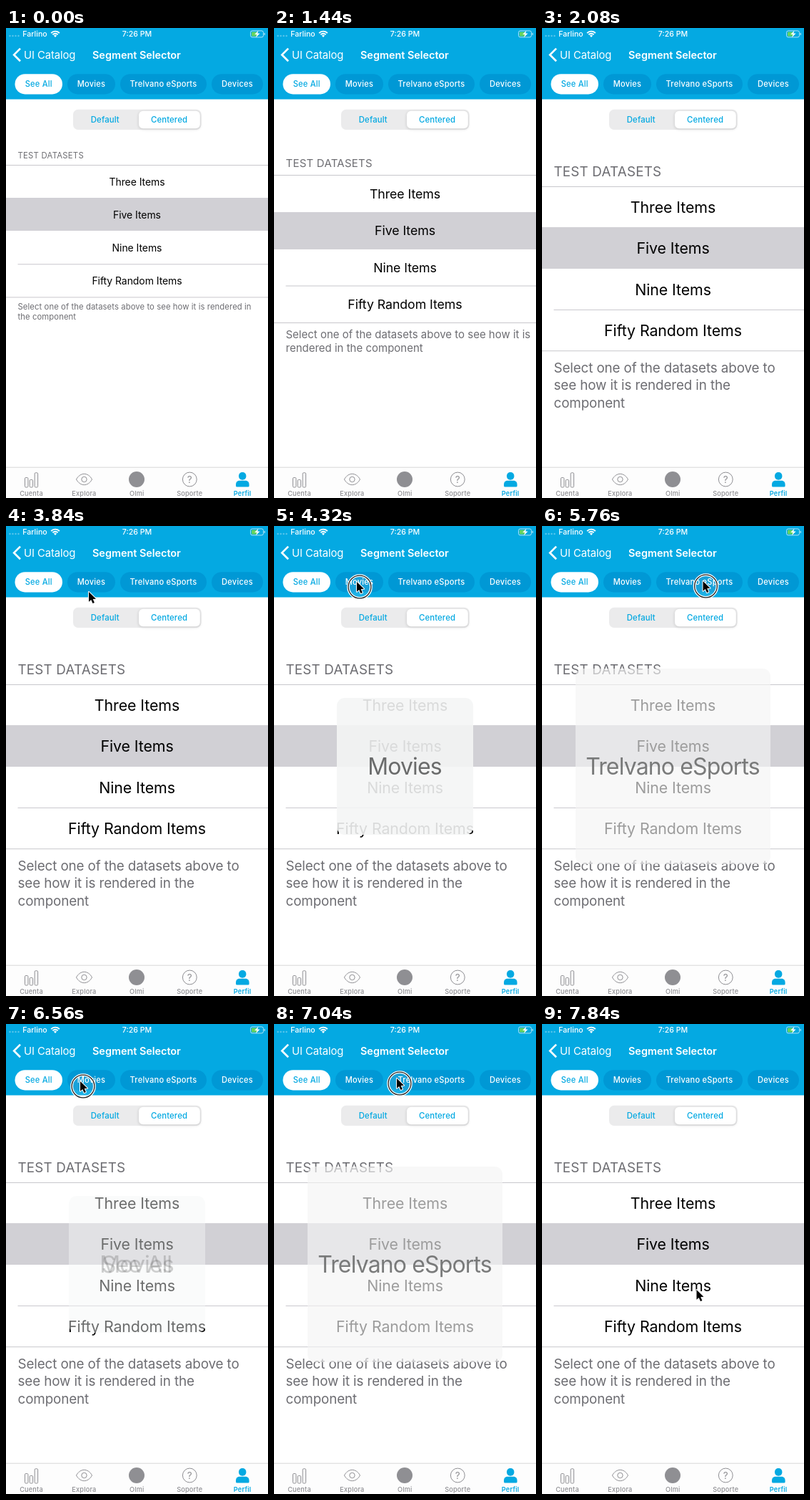
Write an HTML page with a canvas that moves like this. It is 367 px wide and 656 px high and loops after 8 s.

```html
<!DOCTYPE html>
<html lang="en">
<head>
<meta charset="utf-8">
<title>Segment Selector</title>
<style>
  html, body { margin: 0; width: 100%; height: 100%; overflow: hidden; background: #fff; }
  canvas { display: block; width: 367px; height: 656px; }
</style>
</head>
<body>
<canvas id="stage"></canvas>
<script>
const W = 367, H = 656, LOOP = 8000, STEP = 160;
const BLUE = '#04a9e2', CHIP = '#0098d5', GRAY = '#6d6d72', LINE = '#c8c7cc', TAB = '#8f8f93';
const WIDE = 'Trelvano eSports';

const canvas = document.getElementById('stage');
const ctx = canvas.getContext('2d');
const dpr = window.devicePixelRatio || 1;
canvas.width = W * dpr;
canvas.height = H * dpr;

// Table layout for each text size setting
const layouts = [
  { from: 0, header: 182, top: 191.5, row: 46.1, body: 14, small: 11.3, track: .007,
    foot: 393, lead: 14.4,
    lines: ['Select one of the datasets above to see how it is rendered in', 'the component'] },
  { from: 1440, header: 194, top: 205.5, row: 51.5, body: 17.8, small: 15, track: 0,
    foot: 433, lead: 19.4,
    lines: ['Select one of the datasets above to see how it is', 'rendered in the component'] },
  { from: 2080, header: 206.5, top: 221.5, row: 57.3, body: 21.4, small: 18.85, track: -.007,
    foot: 481, lead: 24.3,
    lines: ['Select one of the datasets above to', 'see how it is rendered in the', 'component'] }
];
const rows = ['Three Items', 'Five Items', 'Nine Items', 'Fifty Random Items'];

// time, label, panel opacity, outgoing label
const popups = [
  [4000, 'Movies', .3], [4160, 'Movies', .75], [4320, 'Movies', .89],
  [4800, WIDE, .64], [4960, WIDE, .89],
  [5280, 'Devices', .64], [5440, 'Devices', .89],
  [5760, WIDE, .64], [5920, WIDE, .89],
  [6080, 'Movies', .64], [6240, 'Movies', .89], [6400, 'See All', .89],
  [6560, 'Movies', .44, 'See All'], [6720, 'Movies', .89],
  [7040, WIDE, .64], [7200, WIDE, .89],
  [7520, WIDE, .64], [7680, WIDE, .25], [7840, '', 0]
];

// time, x, y of the pointer tip
const path = [
  [2880, 345, 488], [3360, 225, 275], [3840, 116, 92], [4000, 116, 80], [4320, 116, 78],
  [4640, 116, 78], [4960, 207.5, 76], [5280, 312, 77], [5440, 318, 77], [5760, 225.5, 77],
  [6080, 140, 78], [6400, 66, 80], [6560, 104, 80], [6880, 122, 78], [7040, 172, 76],
  [7200, 196, 76], [7360, 196, 76], [7520, 199, 95], [7840, 216.5, 371]
];

const latest = (list, t, key) => list.filter(k => k[key] <= t).pop();

function pointerAt(t) {
  const i = path.findIndex(k => k[0] > t);
  if (i < 0) return path[path.length - 1].slice(1);
  if (i === 0) return null;
  const [t0, x0, y0] = path[i - 1], [t1, x1, y1] = path[i];
  const u = (t - t0) / (t1 - t0);
  return [x0 + (x1 - x0) * u, y0 + (y1 - y0) * u];
}

function text(str, x, y, size, color, { weight = 400, align = 'left', track = 0 } = {}) {
  ctx.font = `${weight} ${size}px Inter, Roboto, sans-serif`;
  ctx.letterSpacing = `${track * size}px`;
  ctx.textAlign = align;
  ctx.fillStyle = color;
  ctx.fillText(str, x, y);
}

function rect(x, y, w, h, color) {
  ctx.fillStyle = color;
  ctx.fillRect(x, y, w, h);
}

function round(x, y, w, h, r, fill, stroke) {
  ctx.beginPath();
  ctx.roundRect(x, y, w, h, r);
  paint(fill, stroke);
}

function circle(x, y, r, fill, stroke) {
  ctx.beginPath();
  ctx.arc(x, y, r, 0, Math.PI * 2);
  paint(fill, stroke);
}

function poly(points, fill, stroke, closed = true) {
  ctx.beginPath();
  points.forEach(([x, y]) => ctx.lineTo(x, y));
  if (closed) ctx.closePath();
  paint(fill, stroke);
}

function paint(fill, stroke) {
  if (stroke) { ctx.strokeStyle = stroke; ctx.stroke(); }
  if (fill) { ctx.fillStyle = fill; ctx.fill(); }
}

function drawStatus() {
  for (let i = 0; i < 4; i++) circle(5.5 + i * 4, 11, 1.2, 'rgba(255,255,255,.35)');
  text('Farlino', 23.3, 12, 10.6, '#fff', { weight: 500 });
  text('7:26 PM', 183.5, 12, 10.6, '#fff', { weight: 500, align: 'center' });
  ctx.lineWidth = 1.9;
  for (const r of [4.9, 8]) {
    ctx.beginPath();
    ctx.arc(69, 12.6, r, -Math.PI * .76, -Math.PI * .24);
    paint(null, '#fff');
  }
  poly([[66.9, 10.6], [69, 9.6], [71.1, 10.6], [69, 13]], '#fff');
  ctx.lineWidth = 1;
  round(342.5, 3.9, 18, 9, 2.5, null, 'rgba(255,255,255,.65)');
  round(361.6, 6.8, 1.4, 3.2, .7, 'rgba(255,255,255,.65)');
  round(344, 5.4, 8, 6, 1.2, '#65d35f');
  poly([[353.5, 3.6], [348.2, 9], [351.4, 9], [350, 13.2], [355.6, 7.5], [352.3, 7.5]], '#fff');
}

function drawHeader() {
  rect(0, 0, W, 99.5, BLUE);
  drawStatus();
  ctx.lineWidth = 2.7;
  poly([[20, 28.6], [11.2, 37.4], [20, 46.2]], null, '#fff', false);
  text('UI Catalog', 25, 42.6, 14.9, '#fff', { track: -.008 });
  text('Segment Selector', 121, 42.6, 14.5, '#fff', { weight: 600, track: -.004 });
  const chips = [['See All', 12.5, 66.5], ['Movies', 86, 67], [WIDE, 160, 121], ['Devices', 288, 72]];
  chips.forEach(([label, x, w], i) => {
    round(x, 64.2, w, 28.2, 14.1, i ? CHIP : '#fff');
    text(label, x + w / 2, 82.2, 11.1, i ? '#fff' : BLUE, { weight: 500, align: 'center', track: .02 });
  });
}

function drawSegments() {
  round(94, 113.7, 179.5, 28.3, 7, '#ebebec');
  ctx.save();
  ctx.shadowColor = 'rgba(0,0,0,.16)';
  ctx.shadowBlur = 4 * dpr;
  ctx.shadowOffsetY = dpr;
  round(186, 115.7, 85.8, 24.5, 6, '#fff');
  ctx.restore();
  text('Default', 138.8, 132.2, 11.4, BLUE, { weight: 500, align: 'center', track: .01 });
  text('Centered', 228.5, 132.2, 11.4, BLUE, { weight: 500, align: 'center', track: .01 });
}

function drawTable(t) {
  const l = latest(layouts, t, 'from');
  const { top, row, body, small, track } = l;
  text('TEST DATASETS', 16.5, l.header, small, GRAY, { track: track + .016 });
  rect(0, top - .5, W, 1, LINE);
  rect(16.5, top + row * 3 - .5, W, 1, LINE);
  rect(0, top + row * 4 - .5, W, 1, LINE);
  rect(0, Math.round(top + row - .5), W, Math.round(row + .3), '#d1d0d5');
  rows.forEach((name, i) => {
    const y = top + row * (i + .5) + body * .363;
    text(name, W / 2, y, body, '#000', { align: 'center', track: -.005 });
  });
  l.lines.forEach((line, i) => text(line, 16.5, l.foot + i * l.lead, small, GRAY, { track }));
}

function drawTabs() {
  rect(0, 613, W, H - 613, '#fdfdfd');
  rect(0, 612.7, W, 1, '#d8d8d8');
  ctx.lineWidth = 1;
  for (const [x, y] of [[26.5, 627.5], [33.2, 630.5], [40.2, 620.8]]) {
    round(x, y, 4.4, 641 - y, 1.3, null, TAB);
  }
  ctx.beginPath();
  ctx.moveTo(98.5, 630);
  ctx.bezierCurveTo(104, 619.8, 115, 619.8, 120.5, 630);
  ctx.bezierCurveTo(115, 640.2, 104, 640.2, 98.5, 630);
  paint(null, TAB);
  circle(109.5, 630, 3.7, null, TAB);
  circle(183, 630, 11, TAB);
  circle(257.3, 630, 9.9, null, TAB);
  text('?', 257.3, 634.8, 13.5, TAB, { align: 'center' });
  round(326, 620, 10.4, 10.8, 5, BLUE);
  round(322, 631.8, 18.6, 8.6, [5, 5, 1.5, 1.5], BLUE);
  ['Cuenta', 'Explora', 'Olmi', 'Soporte', 'Perfil'].forEach((name, i) => {
    const on = i === 4;
    text(name, 35.5 + i * 73.9, 653.3, 9.2, on ? BLUE : TAB,
      { weight: on ? 600 : 500, align: 'center', track: .02 });
  });
}

function drawPopup(t) {
  const p = latest(popups, t, 0);
  if (!p || !p[1]) return;
  const [, label, alpha, old] = p;
  const size = label === WIDE ? 273 : 191;
  ctx.globalAlpha = alpha;
  round(183.5 - size / 2, 335.5 - size / 2, size, size, 11, '#f4f5f5');
  ctx.globalAlpha = Math.min(1, alpha * 1.4) * (old ? .5 : 1);
  for (const s of [label, old]) {
    if (s) text(s, 183, 347, 32, '#6a6b6b', { align: 'center', track: -.027 });
  }
  ctx.globalAlpha = 1;
}

function drawPointer(t) {
  const tip = pointerAt(t);
  if (!tip) return;
  const [x, y] = tip;
  if (t >= 4000 && t < 7520) {
    const cx = x + 4, cy = y + 7;
    circle(cx, cy, 15.5, 'rgba(255,255,255,.1)');
    ctx.lineWidth = 3.8;
    circle(cx, cy, 15.9, null, '#fff');
    ctx.lineWidth = 1.3;
    circle(cx, cy, 15.9, null, '#222');
  }
  const arrow = [[0, 0], [0, 13.8], [3.2, 10.9], [5.5, 16], [7.9, 15], [5.7, 10], [10, 9.8]];
  ctx.lineWidth = 2;
  ctx.lineJoin = 'round';
  poly(arrow.map(([a, b]) => [x + a, y + b]), '#000', '#fff');
  ctx.lineJoin = 'miter';
}

function draw(now) {
  const t = Math.floor((now % LOOP) / STEP) * STEP;
  ctx.setTransform(dpr, 0, 0, dpr, 0, 0);
  rect(0, 0, W, H, '#fff');
  drawHeader();
  drawSegments();
  drawTable(t);
  drawTabs();
  drawPopup(t);
  drawPointer(t);
}

let start;
function tick(now) {
  start ??= now;
  draw(Math.max(0, now - start));
  requestAnimationFrame(tick);
}
draw(0);
requestAnimationFrame(tick);
</script>
</body>
</html>
```
